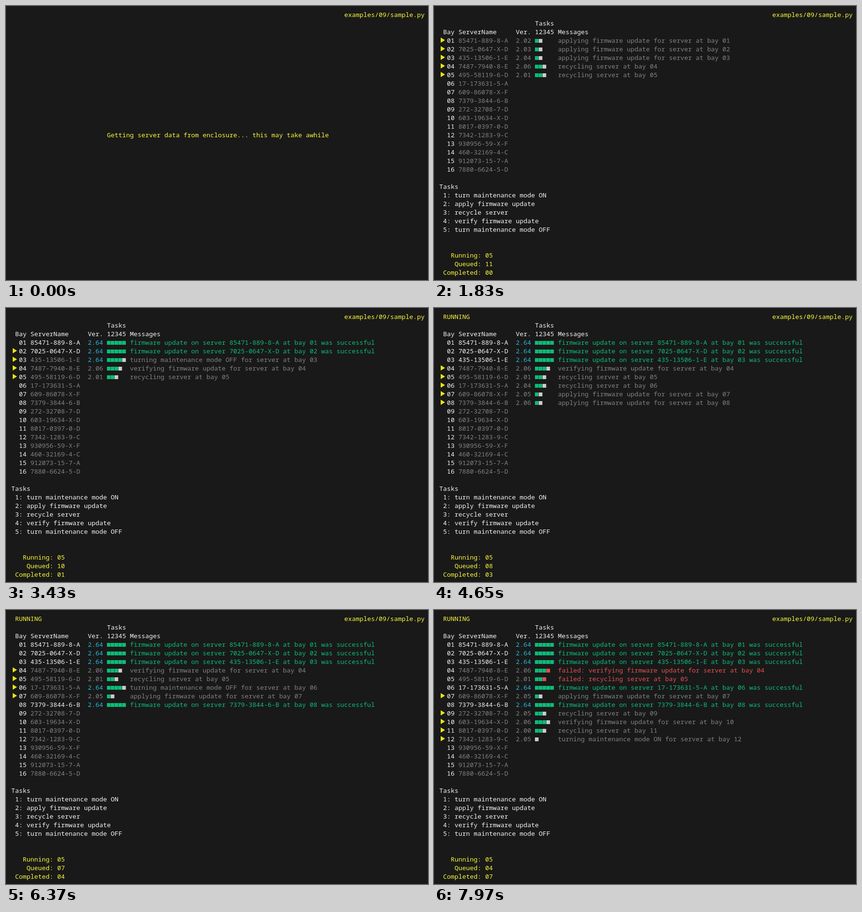
Animation, 882 px wide and 574 px high, one loop 8000 ms. Source, as an HTML page with a canvas:

```html
<!DOCTYPE html>
<html lang="en">
<head>
<meta charset="utf-8">
<title>Firmware update console</title>
<style>
  html, body { margin: 0; width: 100%; height: 100%; overflow: hidden; background: #191919; }
  canvas { display: block; }
</style>
</head>
<body>
<canvas id="screen" width="882" height="574"></canvas>
<script>
const LOOP = 8000;
const CELL = 8, LINE = 18, LEFT = 11, BASE = 23;
const FIRST_ROW = 3, STAGES = 5, BAYS_TOTAL = 16, NEW_VERSION = '2.64';

const C = {
  bg: '#191919', yellow: '#f8f83c', arrow: '#e9e510', white: '#f4f4f4', block: '#cccccc',
  gray: '#828282', green: '#0dbc79', cyan: '#29b8db', red: '#e25050'
};

const TASKS = [
  'turn maintenance mode ON', 'apply firmware update', 'recycle server',
  'verify firmware update', 'turn maintenance mode OFF'
];
const ACTIONS = [
  'turning maintenance mode ON for', 'applying firmware update for', 'recycling',
  'verifying firmware update for', 'turning maintenance mode OFF for'
];

// at: start time of each stage; a sixth time marks success
const SERVERS = [
  { name: '85471-889-8-A', ver: '2.02', at: [740, 1710, 2090, 2450, 2690, 3430] },
  { name: '7025-0647-X-D', ver: '2.03', at: [740, 1470, 2330, 2690, 2810, 3430], exit: 3550 },
  { name: '435-13506-1-E', ver: '2.04', at: [860, 1110, 2210, 2570, 2940, 3910] },
  { name: '7487-7940-8-E', ver: '2.06', at: [860, 1350, 1710, 2450], fail: 7110 },
  { name: '495-58119-6-D', ver: '2.01', at: [980, 1350, 1830], fail: 7110 },
  { name: '17-173631-5-A', ver: '2.04', at: [3550, 3790, 4280, 5260, 6250, 6490] },
  { name: '609-86078-X-F', ver: '2.05', at: [3790, 4280] },
  { name: '7379-3844-6-B', ver: '2.06', at: [4280, 4650, 5140, 5390, 6120, 6370] },
  { name: '272-32708-7-D', ver: '2.05', at: [6490, 6730, 7970] },
  { name: '603-19634-X-D', ver: '2.06', at: [6610, 7460, 7700, 7970] },
  { name: '8017-0397-0-D', ver: '2.00', at: [7340, 7580, 7820] },
  { name: '7342-1283-9-C', ver: '2.05', at: [7340] },
  { name: '930956-59-X-F', at: [] },
  { name: '460-32169-4-C', at: [] },
  { name: '912073-15-7-A', at: [] },
  { name: '7880-6624-5-D', at: [] }
];

const READY = 500;
const BLINKS = [READY, 1470, 2330, 3190, 4040, 4890, 5750, 6610, 7460];

const ctx = document.getElementById('screen').getContext('2d');
const two = n => String(n).padStart(2, '0');
const passed = (times, t) => times.filter(x => t >= x).length;
const px = col => LEFT + col * CELL;
const py = row => BASE + row * LINE;

function print(text, col, row, color) {
  ctx.fillStyle = color;
  ctx.fillText(text, px(col), py(row));
}

function arrow(row) {
  const y = py(row);
  ctx.fillStyle = C.arrow;
  ctx.beginPath();
  ctx.moveTo(14, y - 11);
  ctx.lineTo(23, y - 5.5);
  ctx.lineTo(14, y);
  ctx.fill();
}

function square(index, row, color) {
  ctx.fillStyle = color;
  ctx.fillRect(px(25 + index), py(row) - 8, 7.5, 8);
}

function message(s, bay, stage, done, failed) {
  if (done) return [`firmware update on server ${s.name} at bay ${bay} was successful`, C.green];
  const text = `${ACTIONS[stage - 1]} server at bay ${bay}`;
  return failed ? ['failed: ' + text, C.red] : [text, C.gray];
}

// Draws one table row and reports whether the server has finished.
function drawServer(s, i, t) {
  const row = FIRST_ROW + i, bay = two(i + 1);
  const stage = passed(s.at, t);
  const done = stage > STAGES, failed = t >= s.fail;
  const finished = failed || (done && t >= (s.exit || 0));

  print(bay, 2, row, C.white);
  print(s.name, 5, row, done ? C.white : C.gray);
  if (!stage) return false;

  if (!finished) arrow(row);
  if (stage >= STAGES) print(NEW_VERSION, 20, row, C.cyan);
  else print(s.ver, 20, row, C.gray);

  for (let k = 0; k < Math.min(stage, STAGES); k++) {
    const current = k === stage - 1;
    square(k, row, !current ? C.green : failed ? C.red : C.block);
  }
  const [text, color] = message(s, bay, stage, done, failed);
  print(text, 31, row, color);
  return finished;
}

function drawTable(t) {
  if (passed(BLINKS, t) % 2) print('RUNNING', 1, 0, C.yellow);
  print('Tasks', 25, 1, C.white);
  [['Bay', 1], ['ServerName', 5], ['Ver.', 20], ['12345', 25], ['Messages', 31]]
    .forEach(([label, col]) => print(label, col, 2, C.white));

  const completed = SERVERS.filter((s, i) => drawServer(s, i, t)).length;

  print('Tasks', 0, 20, C.white);
  TASKS.forEach((task, i) => print(`${i + 1}: ${task}`, 1, 21 + i, C.white));

  const running = 5;
  [['Running', running], ['Queued', BAYS_TOTAL - running - completed], ['Completed', completed]]
    .forEach(([label, n], i) => print(`${label}: ${two(n)}`, 10 - label.length, 28 + i, C.yellow));
}

function draw(t) {
  ctx.fillStyle = C.bg;
  ctx.fillRect(0, 0, 882, 574);
  ctx.font = '13.3333px "Noto Sans Mono", "DejaVu Sans Mono", monospace';
  ctx.textBaseline = 'alphabetic';
  print('examples/09/sample.py', 87, 0, C.yellow);
  if (t < READY) print('Getting server data from enclosure... this may take awhile', 25, 14, C.yellow);
  else drawTable(t);
}

let start;
function tick(now) {
  if (start === undefined) start = now;
  draw((now - start) % LOOP);
  requestAnimationFrame(tick);
}
draw(0);
requestAnimationFrame(tick);
</script>
</body>
</html>
```
